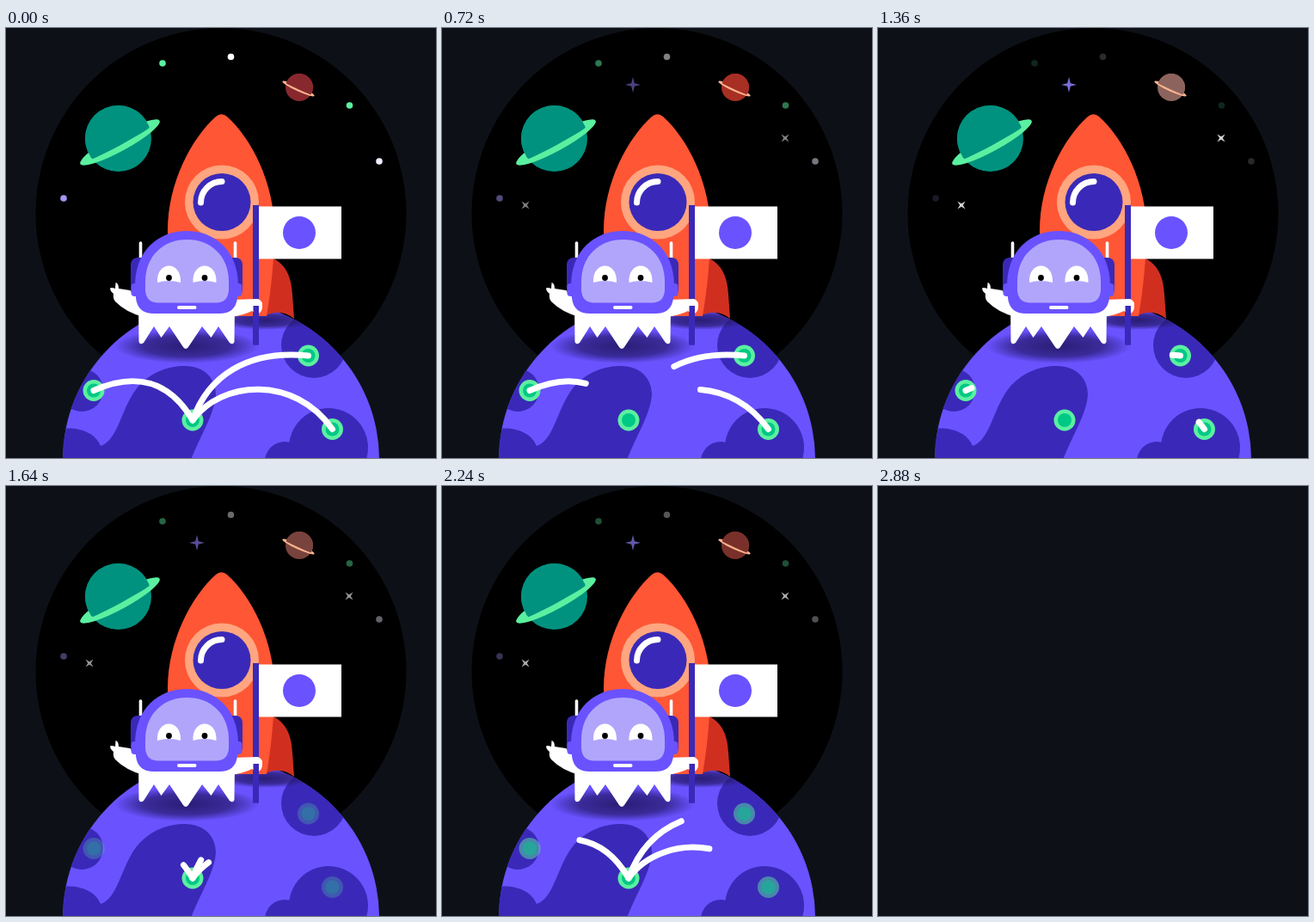
These frames come from a looping animation (500x500 px, 2920 ms). An HTML page with a canvas:

```html
<!DOCTYPE html>
<html lang="en">
<head>
<meta charset="utf-8">
<title>Robot on the moon</title>
<style>
  html, body { margin: 0; width: 100%; height: 100%; overflow: hidden; background: #0d1117; }
  canvas { display: block; width: 500px; height: 500px; }
</style>
</head>
<body>
<canvas id="stage" width="500" height="500"></canvas>
<script>
const ctx = document.getElementById('stage').getContext('2d');
const LOOP = 2920, STEP = 40, SHOW = 2880, HALF = 1440, BLINK = 480;
const VIOLET = '#6a52ff', INDIGO = '#3a29b8', WHITE = '#fff', MINT = '#5bf0a0';

const clamp = v => Math.max(0, Math.min(1, v));

function disc(x, y, r, color) {
  ctx.fillStyle = color;
  ctx.beginPath();
  ctx.arc(x, y, r, 0, 7);
  ctx.fill();
}

function shape(d, color) {
  ctx.fillStyle = color;
  ctx.fill(new Path2D(d));
}

function box(x, y, w, h, r, color) {
  ctx.fillStyle = color;
  ctx.beginPath();
  ctx.roundRect(x, y, w, h, r);
  ctx.fill();
}

function line(d, width, color) {
  ctx.strokeStyle = color;
  ctx.lineWidth = width;
  ctx.lineCap = 'round';
  ctx.stroke(new Path2D(d));
}

function faded(alpha, draw) {
  ctx.save();
  ctx.globalAlpha = alpha;
  draw();
  ctx.restore();
}

// Planet with a tilted ring whose rear half is hidden
function planet(x, y, r, color, ring) {
  disc(x, y, r, color);
  ctx.save();
  ctx.translate(ring.x, ring.y);
  ctx.rotate(ring.tilt);
  ctx.fillStyle = ring.color;
  ctx.beginPath();
  ctx.ellipse(0, 0, ring.rx, ring.ry, 0, 0, 7);
  ctx.fill();
  ctx.restore();

  ctx.save();
  ctx.beginPath();
  ctx.arc(x, y, r, 0, 7);
  ctx.clip();
  ctx.translate(ring.x, ring.y);
  ctx.rotate(ring.tilt);
  ctx.fillStyle = color;
  ctx.fillRect(-r * 2, -r * 2, r * 4, r * 2);
  ctx.beginPath();
  ctx.ellipse(0, 0, ring.rx * 0.87, ring.hole, 0, 0, 7);
  ctx.fill();
  ctx.restore();
}

function spark(x, y, r, turn, color) {
  ctx.save();
  ctx.translate(x, y);
  ctx.rotate(turn);
  ctx.fillStyle = color;
  ctx.beginPath();
  ctx.moveTo(r, 0);
  for (let i = 1; i <= 4; i++) {
    const a = i * Math.PI / 2, m = a - Math.PI / 4;
    ctx.lineTo(Math.cos(m) * r * 0.29, Math.sin(m) * r * 0.29);
    ctx.lineTo(Math.cos(a) * r, Math.sin(a) * r);
  }
  ctx.fill();
  ctx.restore();
}

// Colour of the small planet over time: [ms, r, g, b]
const GLOW = [
  [0, 135, 40, 46], [440, 145, 48, 34], [1040, 194, 46, 36], [1360, 140, 100, 93],
  [1920, 102, 34, 28], [2560, 142, 62, 56], [2880, 135, 40, 46]
];
function glow(t) {
  const i = Math.max(1, GLOW.findIndex(k => k[0] >= t));
  const a = GLOW[i - 1], b = GLOW[i], p = (t - a[0]) / (b[0] - a[0]);
  return `rgb(${[1, 2, 3].map(c => Math.round(a[c] + (b[c] - a[c]) * p))})`;
}

function sky(t) {
  disc(250, 215.5, 215.5, '#000');

  const phase = (t / BLINK) % 2;
  const dots = Math.abs(1 - phase);
  faded(dots, () => {
    disc(182, 41, 3.8, MINT);
    disc(261.5, 33.5, 3.8, WHITE);
    disc(399.5, 90, 3.8, MINT);
    disc(434, 155, 3.8, '#f1ecff');
    disc(67, 198, 3.8, '#a296f6');
  });
  faded(1 - dots, () => {
    spark(222, 66, 9, 0, '#9384ff');
    spark(399, 128, 6.4, Math.PI / 4, WHITE);
    spark(97, 206, 6.4, Math.PI / 4, WHITE);
  });

  planet(130.5, 128.5, 38.5, '#00927f',
    { x: 132.5, y: 133, tilt: -0.5, rx: 52.5, ry: 10, hole: 3, color: MINT });
  planet(341, 69, 16, glow(t),
    { x: 340, y: 70.5, tilt: 0.43, rx: 20.5, ry: 3, hole: 0.8, color: '#ffb590' });
}

function shadow(x, y, rx, ry) {
  ctx.save();
  ctx.translate(x, y);
  ctx.scale(rx, ry);
  const g = ctx.createRadialGradient(0, 0, 0, 0, 0, 1);
  g.addColorStop(0, 'rgba(38,26,110,.95)');
  g.addColorStop(0.6, 'rgba(38,26,110,.7)');
  g.addColorStop(1, 'rgba(38,26,110,0)');
  disc(0, 0, 1, g);
  ctx.restore();
}

function moon() {
  disc(250, 502, 184, VIOLET);
  ctx.save();
  ctx.beginPath();
  ctx.arc(250, 502, 184, 0, 7);
  ctx.clip();
  disc(358, 369, 38, INDIGO);
  disc(375, 488, 46, INDIGO);
  disc(324, 504, 23, INDIGO);
  disc(88, 421, 25, INDIGO);
  shape(`M60 467 C82 462 104 470 110 486 C130 480 134 442 152 419 C168 400 188 393 208 393
    C231 393 244 408 244 426 C243 448 226 474 215 502 L60 502Z`, INDIGO);
  shadow(210, 370, 84, 20);
  shadow(302, 340, 56, 11);
  ctx.restore();
}

function cable(x1, y1, x2, y2, x, y) {
  const d = `M217 456 C${x1} ${y1} ${x2} ${y2} ${x} ${y}`;
  const el = document.createElementNS('http://www.w3.org/2000/svg', 'path');
  el.setAttribute('d', d);
  return { d, x, y, len: el.getTotalLength() };
}
const cables = [
  cable(190, 410, 150, 400, 102, 421.5),
  cable(235, 405, 280, 374, 351.5, 381),
  cable(250, 410, 335, 403, 379.5, 466.5)
];

function node(x, y) {
  disc(x, y, 12.5, MINT);
  disc(x, y, 8, '#00c885');
}

function network(t) {
  const out = 1 - clamp((t - HALF) / 260), back = clamp((t - 1700) / 1140);
  node(217, 456);
  faded(Math.max(out, back), () => cables.forEach(c => node(c.x, c.y)));
  for (const c of cables) {
    ctx.setLineDash([c.len, c.len]);
    ctx.lineDashOffset = -c.len * t / HALF;
    line(c.d, 7, WHITE);
  }
  ctx.setLineDash([]);
}

function rocket() {
  shape('M309 267 C326 275 332 290 333 310 L335 338 Q320 326 302 334Z', '#d02f20');
  shape(`M244 103 Q250.5 97.5 257 103 C285 128 312 180 312 235 C312 270 308 305 303 335
    L197 335 C192 305 188 270 188 235 C188 180 216 128 244 103Z`, '#ff5635');
  disc(251, 202.5, 43, '#ffa57f');
  disc(251, 202.5, 33.5, INDIGO);
  line('M226.5 203 A24.5 24.5 0 0 1 251 178.5', 7, WHITE);
}

function flag() {
  box(287, 206, 7, 162.5, 0, INDIGO);
  box(294, 207.5, 96, 61, 0, WHITE);
  disc(341, 238, 19, VIOLET);
}

function eye(x) {
  shape(`M${x - 13.5} 296 C${x - 15} 270 ${x + 15} 270 ${x + 13.5} 296
    Q${x} 292 ${x - 13.5} 296Z`, WHITE);
  disc(x, 290.5, 3.4, '#000');
}

function robot() {
  line('M156.5 250 V270', 3.6, WHITE);
  line('M266.5 250 V270', 3.6, WHITE);
  // Arms and ragged body
  shape(`M127.5 296 Q131 297 131 303 L144 305 L160 314 L160 336 Q140 331 127 318
    Q124 314 125 309 Q120 305 121.5 302 Q125 302 127 303Z`, WHITE);
  shape('M262 316 L293 315 Q299 317 298 325 Q297 333 290 332 L286 329 Q276 334 262 336Z', WHITE);
  shape(`M154 322 L266 322 L265.5 365 Q264 369 260 366 L247 347 L238.500 360 L228 347
    L212 371 Q209 375 206 371 L190 347 L180.500 360 L172 347 L160 366 Q156 369 154.500 365Z`, WHITE);
  box(287.5, 323, 6.5, 45.5, 0, INDIGO);
  // Helmet
  box(145, 267, 130, 45, 8, INDIGO);
  box(145.500, 297, 129, 15, 4, VIOLET);
  shape(`M150 300 C150 258 178 236 210 236 C242 236 270 258 270 300 L269 314
    Q267 332 248 332 L172 332 Q153 332 151 314Z`, VIOLET);
  shape(`M162 295 C162 264 184 246 210.500 246 C237 246 259 264 259 295 L259 305
    Q258 319.500 244 319.500 L177 319.500 Q163 319.500 162 305Z`, '#b1a5fb');
  eye(189.5);
  eye(231);
  box(199, 323, 22.5, 4, 2, WHITE);
}

function frame(now) {
  const t = Math.floor((now % LOOP) / STEP) * STEP;
  ctx.fillStyle = '#0d1117';
  ctx.fillRect(0, 0, 500, 500);
  if (t < SHOW) {
    sky(t);
    moon();
    network(t);
    rocket();
    flag();
    robot();
  }
}

let start = null;
function tick(now) {
  if (start === null) start = now;
  frame(now - start);
  requestAnimationFrame(tick);
}
frame(0);
requestAnimationFrame(tick);
</script>
</body>
</html>
```
